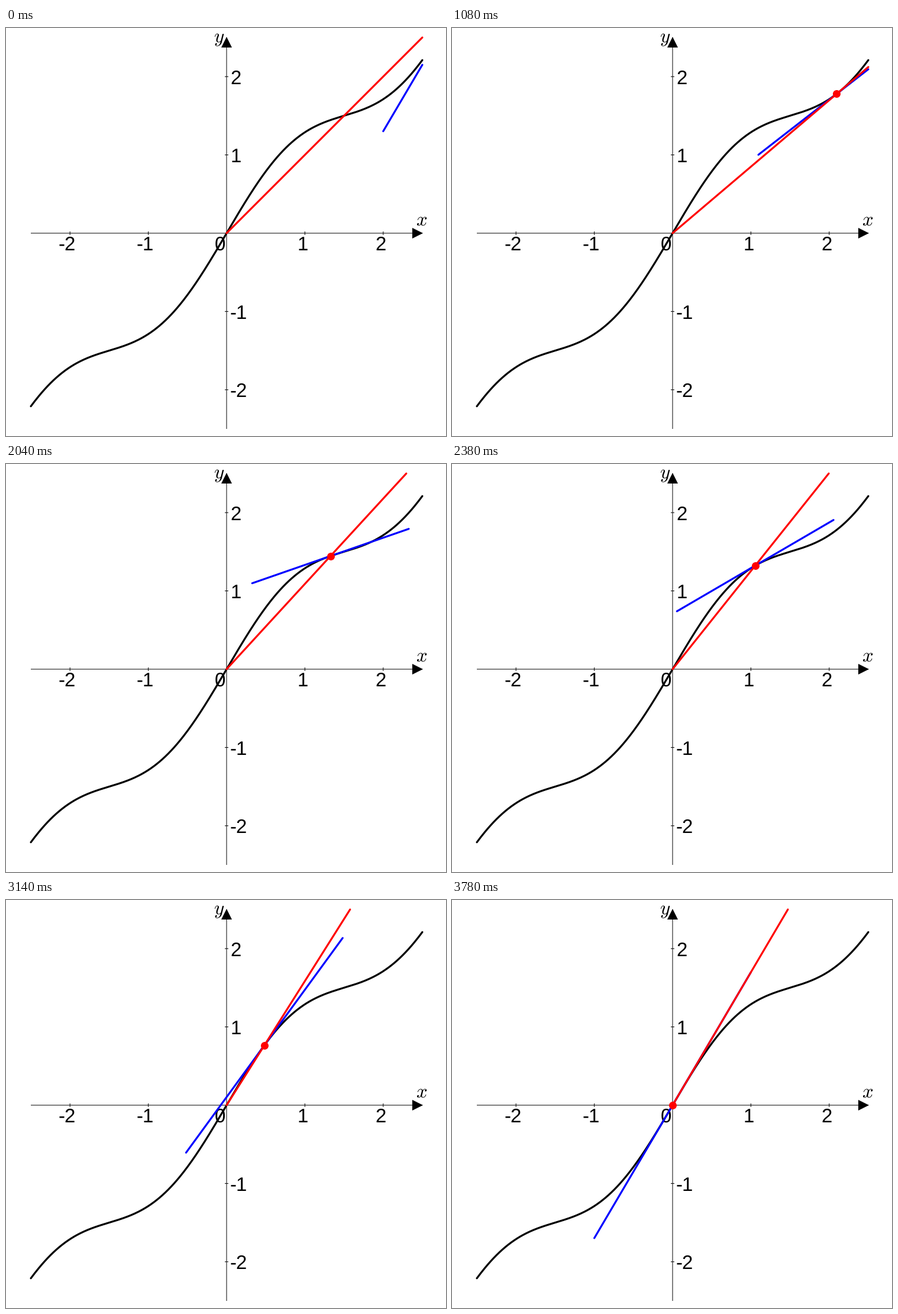
A matplotlib script that plays this animation: 744 px wide and 690 px high, repeating every 4280 ms.

```python
import numpy as np
import matplotlib.pyplot as plt
from matplotlib.animation import FuncAnimation

W, H, DPI = 744, 690, 100
PX = 72 / DPI                 # points per pixel
OX, OY, UNIT = 373, 347, 132.4
LIM = 2.5

plt.rcParams["mathtext.fontset"] = "cm"
plt.rcParams["text.hinting"] = "none"

# The point runs from 3 to 0 in even steps, with a few steps left out.
SKIPPED = {5, 14, 23, 32, 44, 55, 66, 78, 100, 123}
STEPS = [k for k in range(200) if k not in SKIPPED]
FRAMES, INTERVAL = 214, 20


def sx(x):
    return OX + UNIT * np.asarray(x)


def sy(y):
    return OY - UNIT * np.asarray(y)


def f(x):
    return x + np.sin(2 * np.pi * x / 3) / 3


def tangent_slope(x):
    return 1 + 2 * np.pi / 9 * np.cos(2 * np.pi * x / 3)


def secant_slope(x):
    """f(x) / x, also valid at zero."""
    return 1 + 2 * np.pi / 9 * np.sinc(2 * x / 3)


fig = plt.figure(figsize=(W / DPI, H / DPI), dpi=DPI, facecolor="white")
ax = fig.add_axes([0, 0, 1, 1])
ax.set_xlim(0, W)
ax.set_ylim(H, 0)
ax.axis("off")


def line(xs, ys, color, width, z, cap="round"):
    return ax.plot(xs, ys, color=color, lw=width * PX, zorder=z,
                   solid_capstyle=cap, snap=False)[0]


def thin(xs, ys):
    line(xs, ys, "black", 1, 1, "butt")


def arrow(xs, ys):
    ax.fill(xs, ys, color="black", lw=0, snap=False)


def label(x, y, text):
    ax.text(x, y, text, family="Liberation Sans", fontsize=33 * PX,
            ha="left", va="baseline", color="black", zorder=1)


def draw_axes():
    left, right = sx([-LIM, LIM])
    bottom, top = sy([-LIM, LIM])
    thin([left, right], [OY, OY])
    thin([OX, OX], [bottom, top])
    arrow([right + 1, right - 17, right - 17], [OY, OY - 9, OY + 9])
    arrow([OX, OX - 9, OX + 9], [top - 1, top + 17, top + 17])
    for v in (-2, -1, 1, 2):
        x, y = sx(v), sy(v)
        thin([x, x], [OY - 3, OY + 3])
        thin([OX - 3, OX + 3], [y, y])
        label(x - (20 if v < 0 else 13), 376, str(v))
        label(379, y + 12.7, str(v))
    label(353, 376, "0")
    label(693, 334, "$x$")
    label(351, 24, "$y$")


draw_axes()
xs = np.linspace(-LIM, LIM, 400)
line(sx(xs), sy(f(xs)), "black", 3.2, 2)
tangent = line([], [], "#0000ff", 3.2, 3)
secant = line([], [], "#ff0000", 3.2, 4)
dot, = ax.plot([], [], "o", color="#ff0000", ms=13 * PX, mew=0, zorder=5,
               snap=False)


def update(i):
    k = STEPS[min(i, len(STEPS) - 1)]
    x = 3 * (1 - k / 199)

    ends = np.array([x - 1, min(x + 1, LIM)])
    tangent.set_data(sx(ends), sy(f(x) + tangent_slope(x) * (ends - x)))

    slope = secant_slope(x)
    end = min(LIM, LIM / slope)
    secant.set_data(sx([0, end]), sy([0, slope * end]))

    dot.set_data(sx([x]), sy([f(x)]))
    dot.set_visible(x <= LIM)
    return tangent, secant, dot


anim = FuncAnimation(fig, update, frames=FRAMES, interval=INTERVAL,
                     repeat=True, repeat_delay=0, blit=False)
plt.show()
```
